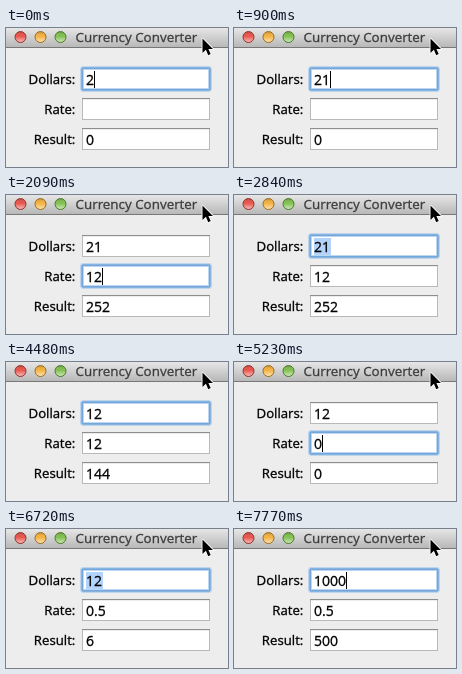
An HTML page that plays this animation: 222x139 px, repeating every 8 s.

```html
<!DOCTYPE html>
<html lang="en">
<head>
<meta charset="utf-8">
<title>Currency Converter</title>
<style>
  html, body { margin: 0; width: 100%; height: 100%; overflow: hidden; background: #ededed; }
  svg { display: block; width: 222px; height: 139px; }
  text { font-family: "Open Sans", "Noto Sans", sans-serif; fill: #000; stroke: #000; stroke-width: .3; }
  .title { font-size: 13.4px; fill: #3c3c3c; stroke: #3c3c3c; }
  .label { font-size: 13.2px; text-anchor: end; }
  .value { font-size: 14px; }
  .ring rect { fill: none; }
  .mark { fill: #b2d3fb; }
</style>
</head>
<body>
<svg viewBox="0 0 222 139">
  <defs>
    <linearGradient id="bar" x2="0" y2="1">
      <stop offset="0" stop-color="#e6e6e6"/>
      <stop offset="1" stop-color="#b8b8b8"/>
    </linearGradient>
    <linearGradient id="shine" x2="0" y2="1">
      <stop offset="0" stop-color="#000" stop-opacity=".2"/>
      <stop offset=".4" stop-color="#fff" stop-opacity="0"/>
      <stop offset="1" stop-color="#fff" stop-opacity=".6"/>
    </linearGradient>
    <g id="box">
      <rect x="76" y="40" width="128" height="22" fill="#b9b9b9"/>
      <rect x="76" y="40" width="128" height="1" fill="#8e8e8e"/>
      <rect x="77" y="41" width="126" height="20" fill="#fff"/>
      <rect x="77" y="41" width="126" height="1" fill="#ececec"/>
    </g>
  </defs>

  <rect width="222" height="139" fill="#ededed"/>
  <rect width="222" height="19" fill="url(#bar)"/>
  <rect y="19" width="222" height="1" fill="#777"/>
  <g id="lights"></g>
  <text class="title" x="69.5" y="14">Currency Converter</text>

  <text class="label" x="69.3" y="56">Dollars:</text>
  <text class="label" x="69.3" y="86">Rate:</text>
  <text class="label" x="69.3" y="116">Result:</text>
  <use href="#box"/>
  <use href="#box" y="30"/>
  <use href="#box" y="60"/>

  <g id="focus">
    <g class="ring">
      <rect x="74.5" y="38.5" width="131" height="25" rx="2.5" stroke="#bfd5eb"/>
      <rect x="75.5" y="39.5" width="129" height="23" rx="1.5" stroke="#86b3e0"/>
      <rect x="76.5" y="40.5" width="127" height="21" stroke="#74a8dc"/>
      <rect x="77.5" y="41.5" width="125" height="19" stroke="#bdd7f0"/>
    </g>
    <rect id="mark" class="mark" x="80" y="43" height="17"/>
  </g>
  <text id="dollars" class="value" x="80" y="57"></text>
  <text id="rate" class="value" x="80" y="87"></text>
  <text id="result" class="value" x="80" y="117"></text>
  <rect id="caret" y="43" width="1" height="17"/>

  <path d="M196.5 10.5V25L199.9 21.8L202.2 27.2L204.7 26.1L202.4 20.9H207Z"
        fill="#000" stroke="#fff" stroke-width="1.6" stroke-linejoin="round" paint-order="stroke"/>
</svg>
<script>
  const LOOP = 8000;
  const $ = id => document.getElementById(id);

  $("lights").innerHTML = [[14.5, "#e8524a", "#8d3a34"], [34.5, "#f3b03c", "#93702c"], [54.5, "#7fbf4d", "#4f7a36"]]
    .map(([x, fill, edge]) =>
      `<circle cx="${x}" cy="9" r="5.5" fill="${fill}" stroke="${edge}"/>` +
      `<circle cx="${x}" cy="9" r="5" fill="url(#shine)"/>`).join("");

  // start time, dollars, rate, focused row, cursor: "on", "off" or "all" (selected)
  const steps = [
    [0, "2", "", 0, "on"],
    [600, "2", "", 0, "off"],
    [900, "21", "", 0, "on"],
    [1190, "21", "", 1, "on"],
    [1640, "21", "", 1, "off"],
    [1940, "21", "1", 1, "on"],
    [2090, "21", "12", 1, "on"],
    [2690, "21", "12", 1, "off"],
    [2840, "21", "12", 0, "all"],
    [3580, "1", "12", 0, "on"],
    [3880, "12", "12", 0, "on"],
    [4480, "12", "12", 0, "off"],
    [4930, "12", "12", 1, "all"],
    [5230, "12", "0", 1, "on"],
    [5370, "12", "0.", 1, "on"],
    [5520, "12", "0.5", 1, "on"],
    [5970, "12", "0.5", 1, "off"],
    [6570, "12", "0.5", 1, "on"],
    [6720, "12", "0.5", 0, "all"],
    [7320, "1", "0.5", 0, "on"],
    [7470, "10", "0.5", 0, "on"],
    [7620, "100", "0.5", 0, "on"],
    [7770, "1000", "0.5", 0, "on"]
  ];

  const textWidth = s => [...s].reduce((w, c) => w + (c === "." ? 4 : 8), 0);

  function show([, dollars, rate, row, cursor]) {
    const width = textWidth(row ? rate : dollars);
    const shift = `translate(0 ${row * 30})`;
    $("dollars").textContent = dollars;
    $("rate").textContent = rate;
    $("result").textContent = Math.floor(dollars * rate);
    $("focus").setAttribute("transform", shift);
    $("mark").setAttribute("width", cursor === "all" ? width + 1 : 0);
    $("caret").setAttribute("transform", shift);
    $("caret").setAttribute("x", 80 + width);
    $("caret").setAttribute("visibility", cursor === "on" ? "visible" : "hidden");
  }

  const start = performance.now();
  let current;
  function tick() {
    const t = (performance.now() - start) % LOOP;
    const step = steps.findLast(s => s[0] <= t) || steps[0];
    if (step !== current) show(current = step);
    requestAnimationFrame(tick);
  }
  tick();
</script>
</body>
</html>
```
